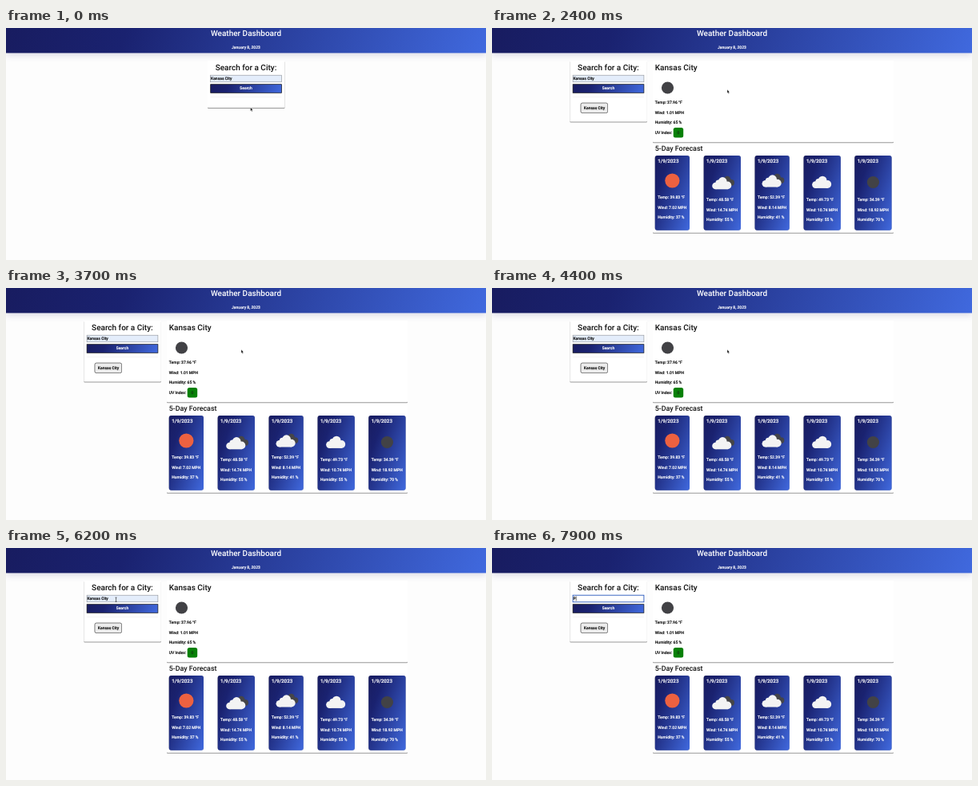
These frames come from a looping animation (600x291 px, 8 s). An HTML page:

```html
<!DOCTYPE html>
<html lang="en">
<head>
<meta charset="utf-8">
<title>Weather Dashboard</title>
<style>
  html, body { margin: 0; width: 100%; height: 100%; overflow: hidden; background: #fdfdfd; }
  svg { display: block; width: 100vw; height: 100vh; }
  text { font-family: Roboto, sans-serif; font-weight: 500; text-rendering: geometricPrecision; white-space: pre; }
  .header { filter: drop-shadow(0 3px 4px #22226626); }
  .panel { fill: #fff; filter: drop-shadow(0 1px .6px #0006); }
  .card { filter: drop-shadow(0 .7px .6px #0005); }
</style>
</head>
<body>
<svg id="stage" viewBox="0 0 600 291" preserveAspectRatio="none"></svg>
<script>
const NS = 'http://www.w3.org/2000/svg';
const stage = document.getElementById('stage');
const LOOP = 8000, RESULTS = 2200, FOCUS = 6500, ERASE = 7100, TYPE = 7700;
const CITY = 'Kansas City', DARK = '#111';

function add(parent, tag, attrs = {}, content = '') {
  const el = document.createElementNS(NS, tag);
  for (const key in attrs) el.setAttribute(key, attrs[key]);
  el.textContent = content;
  return parent.appendChild(el);
}
const group = parent => add(parent, 'g');
const rect = (p, x, y, width, height, attrs) => add(p, 'rect', { x, y, width, height, ...attrs });
const circle = (p, cx, cy, r, fill) => add(p, 'circle', { cx, cy, r, fill });
const centred = { 'text-anchor': 'middle' };
const white = { fill: '#fff' };

// y is the middle of the capitals; small text gets a hairline to stay dark
function label(p, x, y, size, str, attrs) {
  const look = { fill: DARK, ...attrs };
  const weight = size < 7 ? { stroke: look.fill, 'stroke-width': .16 } : {};
  return add(p, 'text', { x, y: y + size * .355, 'font-size': size, ...look, ...weight }, str);
}

// Box with a gradient that leans like CSS 110deg
const LEAN = 110 * Math.PI / 180;
let gradients = 0;
function gradientBox(p, x, y, w, h, attrs) {
  const id = 'g' + gradients++, cx = x + w / 2, cy = y + h / 2;
  const sin = Math.sin(LEAN), cos = -Math.cos(LEAN), half = (w * sin + h * cos) / 2;
  const grad = add(p, 'linearGradient', { id, gradientUnits: 'userSpaceOnUse',
    x1: cx - sin * half, y1: cy - cos * half, x2: cx + sin * half, y2: cy + cos * half });
  [[0, '#181c60'], [.25, '#1a2270'], [1, '#4069de']].forEach(([offset, color]) =>
    add(grad, 'stop', { offset, 'stop-color': color }));
  return rect(p, x, y, w, h, { fill: `url(#${id})`, ...attrs });
}

function cloud(p, x, y, scale, fill) {
  const g = add(p, 'g', { transform: `translate(${x} ${y}) scale(${scale})`, fill });
  [[-7.7, 3.2, 4.3], [-4, -.5, 3.8], [1, -2.3, 5.4], [7.2, 2.6, 4.9]].forEach(([cx, cy, r]) =>
    circle(g, cx, cy, r, fill));
  rect(g, -7.7, 0, 15, 7.5);
}

function icon(p, kind, x, y) {
  if (kind === 'sun') circle(p, x, y, 9.1, '#ed6140');
  if (kind === 'moon') circle(p, x, y, 7.6, '#424246');
  if (kind === 'broken') cloud(p, x + 5.5, y - 3, .8, '#454548');
  if (kind === 'broken' || kind === 'cloud') cloud(p, x - .6, y, 1, '#f3f3f3');
}

gradientBox(stage, 0, 0, 600, 31.4, { class: 'header' });
label(stage, 300, 6.7, 10, 'Weather Dashboard', { ...centred, ...white });
label(stage, 300, 24, 5, 'January 8, 2023', { ...centred, ...white });

// Search panel, drawn at its first place and shifted later
const search = group(stage);
const panel = rect(search, 252, 41, 96.5, 59, { rx: 1, class: 'panel' });
label(search, 300, 49.2, 10, 'Search for a City:', centred);
const field = rect(search, 255.7, 59.2, 88.8, 8.6);
const query = label(search, 256, 63, 5, CITY);
const caret = rect(search, 256, 60.4, .6, 6, { fill: DARK });
gradientBox(search, 255.7, 70.7, 88.8, 10.6, { stroke: DARK, 'stroke-width': .7 });
label(search, 300, 75.6, 5, 'Search', { ...centred, ...white });
rect(search, 255.5, 86.5, 89, .4, { fill: '#e4e4e4' });

// Results
const results = group(stage);
rect(results, 111, 94.1, 33.6, 12.5, { rx: 2, fill: '#ececec', stroke: '#444', 'stroke-width': .6, class: 'card' });
label(results, 128, 100, 5, CITY, centred);
rect(results, 201, 41, 301, 102.2, { rx: 1, class: 'panel' });
label(results, 203.8, 49.2, 10, CITY);
icon(results, 'moon', 219.5, 75);
['Temp: 37.96 °F', 'Wind: 1.01 MPH', 'Humidity: 65 %', 'UV Index:'].forEach((str, i) =>
  label(results, 203.8, 93.2 + i * 12.6, 5, str));
rect(results, 226.7, 125.1, 12.5, 12.5, { rx: 2.5, fill: '#078007' });
label(results, 232.9, 131.3, 5, '0', { ...centred, fill: '#123f12' });
rect(results, 201, 145.5, 301, 111.2, { rx: 1, class: 'panel' });
label(results, 203.8, 151, 8.9, '5-Day Forecast');

[
  [203.7, 43.3, 'sun', 191.5, '39.83', '7.02', 37],
  [264.6, 46.4, 'broken', 194.8, '48.58', '14.74', 55],
  [328.5, 43.3, 'broken', 192, '52.39', '8.14', 41],
  [389.5, 46.4, 'cloud', 193.4, '49.73', '10.74', 55],
  [453.2, 46.4, 'moon', 193.5, '34.39', '18.92', 70]
].forEach(([x, w, kind, y, temp, wind, humidity]) => {
  gradientBox(results, x, 160, w, 93.8, { rx: 3, class: 'card' });
  label(results, x + 3.5, 166.3, 6.25, '1/9/2023', white);
  icon(results, kind, x + w / 2, y);
  const top = w < 45 ? 212.3 : 215.3;
  [`Temp: ${temp} °F`, `Wind: ${wind} MPH`, `Humidity: ${humidity} %`].forEach((str, i) =>
    label(results, x + 3.5, top + i * 12.6, 5, str, white));
});

// Pointer shapes share one hot spot at 0,0
const pointer = group(stage);
const line = { stroke: '#fff', 'stroke-width': .4 };
const shapes = {
  arrow: add(pointer, 'path', { d: 'M0 0V4.4L1 3.5L1.7 5.1L2.5 4.8L1.8 3.2H3.1Z', fill: '#000', ...line }),
  hand: add(pointer, 'path', { d: 'M-.5 0H.4V1.5L2.3 2V3.6L1.6 4.8H-.7L-2 2.8L-1.4 2.3L-.5 3Z',
    fill: '#fff', stroke: DARK, 'stroke-width': .5 }),
  beam: add(pointer, 'path', { d: 'M-1 -2.6H1M0 -2.6V2.6M-1 2.6H1', fill: 'none', stroke: '#222', 'stroke-width': .6 })
};

// Each move: start, end, then where it goes and how far it sags on the way
const moves = [
  [100, 900, 296, 78.6, 0],
  [1500, 2200, 294, 77.3, 0],
  [5200, 6270, 135.6, 63.5, 21.6]
];
function pointerAt(t) {
  let x = 305.6, y = 99.8;
  for (const [from, to, toX, toY, sag] of moves) {
    const k = Math.min(1, Math.max(0, (t - from) / (to - from))), e = k * k * (3 - 2 * k);
    x += (toX - x) * e;
    y += (toY - y) * e + 4 * sag * e * (1 - e);
  }
  return [x, y];
}

function queryAt(t) {
  if (t >= TYPE) return 'P';
  if (t < ERASE) return CITY;
  return CITY.slice(0, Math.max(0, CITY.length - 1 - Math.floor((t - ERASE) / 45)));
}

function draw(t) {
  const found = t >= RESULTS, focused = t >= FOCUS, shift = found ? -154.6 : 0;
  results.style.display = found ? '' : 'none';
  search.setAttribute('transform', `translate(${shift} 0)`);
  panel.setAttribute('height', found ? 76.4 : 59);

  const str = queryAt(t);
  query.textContent = str;
  field.setAttribute('fill', t < ERASE ? '#e4edfb' : '#fff');
  field.setAttribute('stroke', focused ? '#1d4fb8' : '#8b8f96');
  field.setAttribute('stroke-width', focused ? .85 : .6);
  caret.setAttribute('x', 256.2 + (str ? query.getComputedTextLength() : 0));
  const blink = t >= ERASE || (t - FOCUS) % 1000 < 500;
  caret.style.display = focused && blink ? '' : 'none';

  const [x, y] = pointerAt(t), px = x - shift;
  const inside = px > 255 && px < 345;
  const shape = inside && y > 70 && y < 82 ? 'hand' : inside && y > 59 && y < 68 ? 'beam' : 'arrow';
  for (const name in shapes) shapes[name].style.display = name === shape ? '' : 'none';
  pointer.setAttribute('transform', `translate(${x} ${y})`);
  pointer.style.display = t < ERASE ? '' : 'none';
}

const start = performance.now();
function tick() {
  const t = (performance.now() - start) % LOOP;
  draw(Math.floor(t / 100) * 100);
  requestAnimationFrame(tick);
}
tick();
</script>
</body>
</html>
```
